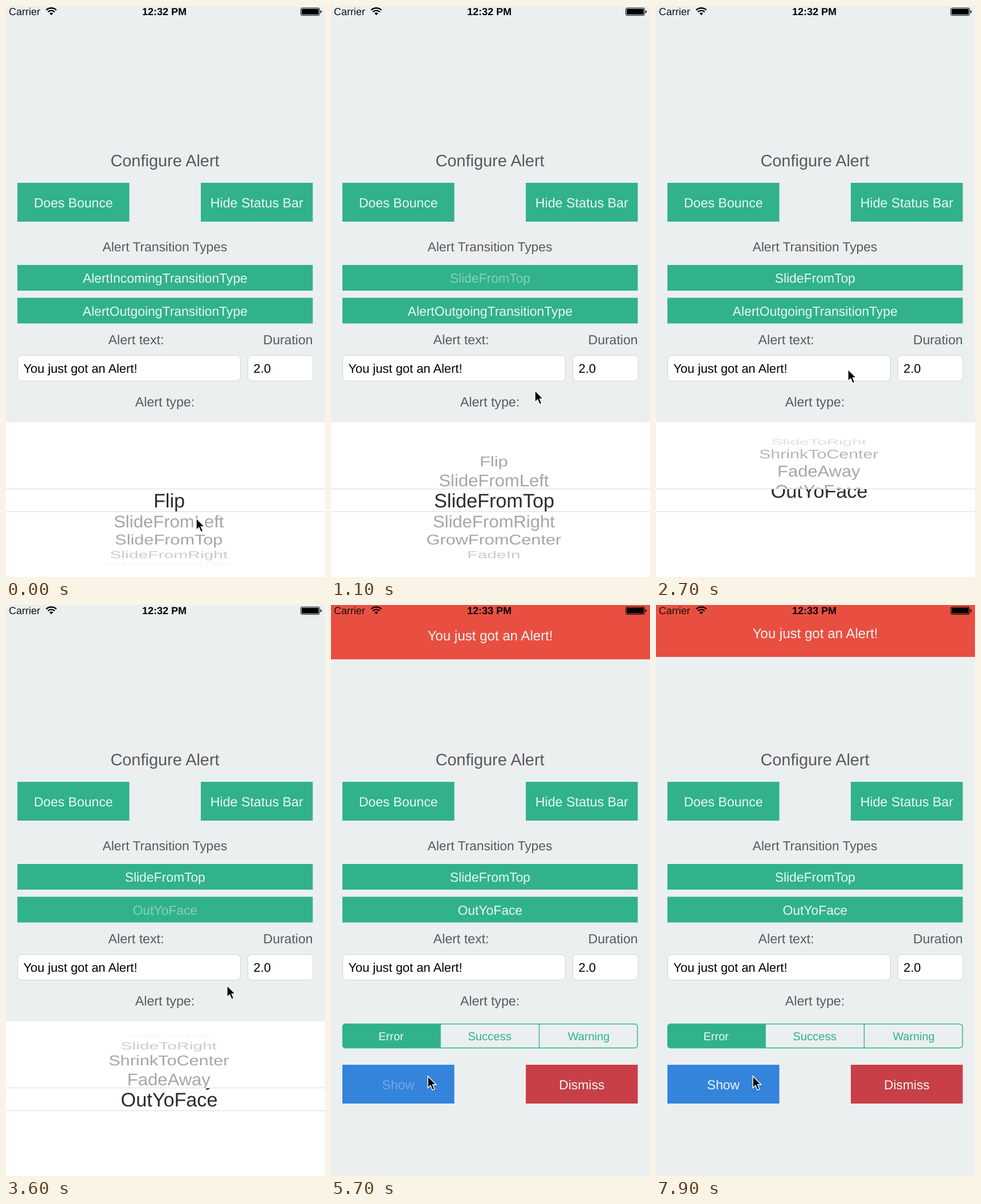
An HTML page that plays this animation: 560x1001 px, repeating every 8000 ms.

```html
<!DOCTYPE html>
<html lang="en">
<head>
<meta charset="utf-8">
<title>Alert configuration</title>
<style>
  html, body { margin: 0; width: 100%; height: 100%; overflow: hidden; background: #ebeff0; }
  svg {
    display: block; width: 560px; height: 1001px;
    font-family: "Liberation Sans", Arial, sans-serif; text-rendering: geometricPrecision;
  }
</style>
</head>
<body>
<svg id="stage" viewBox="0 0 560 1001">
  <defs>
    <clipPath id="band"><rect y="847" width="560" height="39"/></clipPath>
    <clipPath id="around"><path d="M0 730H560V847H0ZM0 886H560V1001H0Z"/></clipPath>
  </defs>
  <rect width="560" height="1001" fill="#ebeff0"/>
  <g id="form"></g>
  <g id="picker">
    <rect y="730" width="560" height="272" fill="#fff"/>
    <g id="wheel" clip-path="url(#around)"></g>
    <g id="lens" clip-path="url(#band)"></g>
    <path d="M0 846.5H560M0 886.5H560" stroke="#dcdcdc"/>
  </g>
  <g id="alert"><rect y="-60" width="560" height="151" fill="#e94f40"/></g>
  <g id="status">
    <g fill="none" stroke="#000" stroke-width="2.4">
      <path d="M70.6 7.2a12.6 12.6 0 0 1 17.8 0M73.6 10.3a8.4 8.4 0 0 1 11.8 0"/>
    </g>
    <path d="M79.5 16.2l-3.2-3.4a4.6 4.6 0 0 1 6.4 0z"/>
    <rect x="517.5" y="3.5" width="33" height="13" rx="2.5" fill="none" stroke="#000"/>
    <rect x="519" y="5" width="30" height="10" rx="1.2"/>
    <path d="M552 7.5q2 .5 2 2.5t-2 2.5z"/>
  </g>
  <path id="cursor" d="M0 0V20.5L4.7 16.2L8.2 24.2L11.8 22.6L8.4 14.8H14.6Z" stroke="#fff" stroke-width="1.4"/>
</svg>
<script>
const LOOP = 8000, STEP = 100;
const GREEN = '#31b28a', LABEL = '#57595b', LIGHT = '#eaf8f3';
const MID = 867, RADIUS = 117, ANGLE = 0.3125, EDGE = 1.32;

const INCOMING = ['Flip', 'SlideFromLeft', 'SlideFromTop', 'SlideFromRight', 'GrowFromCenter', 'FadeIn'];
const OUTGOING = ['Flip', 'SlideToLeft', 'SlideToTop', 'SlideToRight', 'ShrinkToCenter', 'FadeAway', 'OutYoFace'];

const $ = id => document.getElementById(id);

function add(parent, tag, attrs) {
  const el = document.createElementNS('http://www.w3.org/2000/svg', tag);
  for (const key in attrs) el.setAttribute(key, attrs[key]);
  return parent.appendChild(el);
}

// Places text with its capitals centred on y.
function text(parent, str, x, y, size, fill, more) {
  const el = add(parent, 'text', {
    x, y: y + size * 0.36, 'font-size': size, fill, 'text-anchor': 'middle', ...more
  });
  el.textContent = str;
  return el;
}

function button(str, x, y, width, height, fill, size = 22.9) {
  add(form, 'rect', { x, y, width, height, fill });
  return text(form, str, x + width / 2, y + height / 2 + 0.7, size, LIGHT);
}

function field(str, x, width) {
  add(form, 'rect', { x: x + 0.5, y: 612.5, width, height: 45, rx: 7, fill: '#fff', stroke: '#cfd3d4' });
  text(form, str, x + 10.5, 635, 21.9, '#000', { 'text-anchor': 'start' });
}

const form = $('form');
text(form, 'Configure Alert', 279, 270.5, 28.9, LABEL);
button('Does Bounce', 20, 310, 196.5, 68, GREEN, 23.1);
button('Hide Status Bar', 342, 310, 196.5, 68, GREEN, 23.3);
text(form, 'Alert Transition Types', 279, 422, 22.8, LABEL);
const incoming = button('', 20, 454, 518.5, 45, GREEN, 22.9);
const outgoing = button('', 20, 511.5, 518.5, 45, GREEN, 22.9);
text(form, 'Alert text:', 228.5, 585, 23.2, LABEL);
text(form, 'Duration', 538.5, 585, 23, LABEL, { 'text-anchor': 'end' });
field('You just got an Alert!', 20, 391);
field('2.0', 424, 114.5);
text(form, 'Alert type:', 279, 694, 23.2, LABEL);

add(form, 'path', { d: 'M192 734H25a5 5 0 0 0-5 5V772a5 5 0 0 0 5 5H192Z', fill: GREEN });
add(form, 'rect', { x: 20.5, y: 734.5, width: 517.5, height: 42, rx: 5, fill: 'none', stroke: GREEN, 'stroke-width': 1.4 });
add(form, 'path', { d: 'M192 734V777M365.5 734V777', stroke: GREEN, 'stroke-width': 1.4 });
text(form, 'Error', 105.5, 756, 20, LIGHT);
text(form, 'Success', 278.5, 756, 20.3, GREEN);
text(form, 'Warning', 452.5, 756, 19.9, GREEN);
const show = button('Show', 20, 806, 196.5, 68, '#3484dc');
button('Dismiss', 342, 806, 196.5, 68, '#c83f48');

text($('alert'), 'You just got an Alert!', 279.5, 49, 24.1, LIGHT);
text($('status'), 'Carrier', 5, 10, 18, '#111', { 'text-anchor': 'start' });
const clock = text($('status'), '', 278, 10, 18, '#000', { 'font-weight': 'bold' });

const rows = OUTGOING.map(() => ({
  dim: text($('wheel'), '', 0, 0, 31.2, '#000'),
  bold: text($('lens'), '', 0, 0, 34.2, '#2b2a2c')
}));

// Each step: time, then values; moves are eased between steps.
const CURSOR = [
  [0, 334, 898], [200, 334, 898], [600, 337, 822], [800, 337, 818], [1100, 358, 674],
  [1400, 347, 538], [1600, 347, 538], [1900, 336, 870], [2000, 336, 870], [2600, 337, 637],
  [2900, 337, 637], [3500, 388, 667], [3800, 388, 667], [4000, 393, 676], [4500, 393, 676],
  [5200, 170, 826]
];
const INCOMING_ROW = [[200, 0], [700, 2]];
const OUTGOING_ROW = [[2000, 2], [2600, 6.47], [2900, 6.47], [3300, 6]];
const PICKER_Y = [[3800, 0], [4200, 272]];
const INCOMING_FADE = [[1000, 0.15], [1250, 1]];
const OUTGOING_FADE = [[3500, 0.15], [3750, 1]];
const OUTGOING_PRESS = [[1450, 1], [1451, 0.25], [1550, 0.25], [1750, 1]];
const SHOW_PRESS = [[5350, 1], [5351, 0.25], [5650, 0.25], [5900, 1]];

function at(steps, t) {
  const i = steps.findIndex(s => s[0] > t);
  if (i === 0) return steps[0].slice(1);
  if (i < 0) return steps[steps.length - 1].slice(1);
  const a = steps[i - 1], b = steps[i];
  const u = (t - a[0]) / (b[0] - a[0]), e = u * u * (3 - 2 * u);
  return a.slice(1).map((v, k) => v + (b[k + 1] - v) * e);
}

function move(el, x, y, sx = 1, sy = sx) {
  el.setAttribute('transform', `translate(${x} ${y}) scale(${sx} ${sy})`);
}

function label(el, str, opacity = 1) {
  if (el.textContent !== str) el.textContent = str;
  el.setAttribute('opacity', opacity);
}

// Rows sit on a cylinder; the lens shows the chosen row larger and darker.
function turnWheel(list, pos) {
  rows.forEach(({ dim, bold }, i) => {
    const a = (i - pos) * ANGLE, room = EDGE - Math.abs(a);
    const y = MID + RADIUS * Math.sin(a), c = Math.cos(a), s = 0.91 + 0.09 * c;
    const str = room > 0 && list[i] || '';
    label(dim, str, 0.35 * Math.max(0, Math.min(1, room * 1.5)));
    label(bold, str);
    move(dim, 285.8, y, s, s * c);
    move(bold, 286.5, y, 1, c);
  });
}

// Underdamped spring from above the stage to rest.
function alertY(t) {
  if (t < 0) return -100;
  const w = 12.6, k = 12.3;
  return -91 * Math.exp(-k * t) * (Math.cos(w * t) + k / w * Math.sin(w * t));
}

function draw(t) {
  label(clock, t < 5000 ? '12:32 PM' : '12:33 PM');
  if (t < 1000) label(incoming, 'AlertIncomingTransitionType');
  else label(incoming, 'SlideFromTop', at(INCOMING_FADE, t)[0]);
  if (t < 3500) label(outgoing, 'AlertOutgoingTransitionType', at(OUTGOING_PRESS, t)[0]);
  else label(outgoing, 'OutYoFace', at(OUTGOING_FADE, t)[0]);
  label(show, 'Show', at(SHOW_PRESS, t)[0]);

  if (t < 1550) turnWheel(INCOMING, at(INCOMING_ROW, t)[0]);
  else turnWheel(OUTGOING, at(OUTGOING_ROW, t)[0]);
  move($('picker'), 0, at(PICKER_Y, t)[0]);
  move($('alert'), 0, alertY((t - 5450) / 1000));
  move($('cursor'), ...at(CURSOR, t));
}

const start = performance.now();
function tick() {
  const t = (performance.now() - start) % LOOP;
  draw(Math.floor(t / STEP) * STEP);
  requestAnimationFrame(tick);
}
tick();
</script>
</body>
</html>
```
